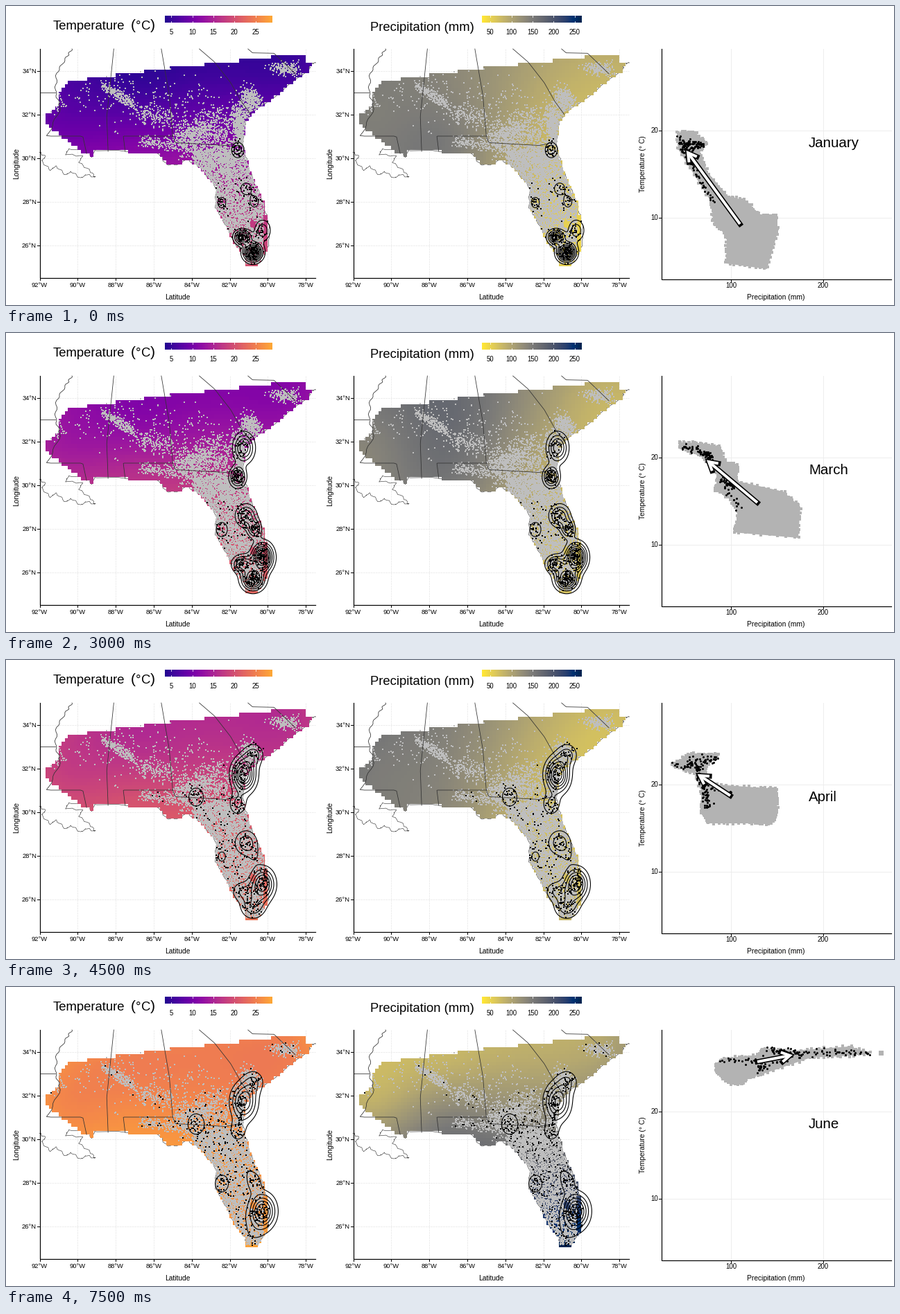
Recreate the animation shown at these times as a matplotlib script. Size 1280 px wide and 432 px high, loop 8 s.

```python
import numpy as np
import matplotlib.pyplot as plt
from matplotlib.animation import FuncAnimation
from matplotlib.colors import LinearSegmentedColormap, Normalize
from matplotlib.path import Path

W, H, DPI = 1280, 432, 100
PX = 72 / DPI                      # points per pixel
MAP_SHIFT = 452                    # distance between the two maps
plt.rcParams["font.family"] = "Liberation Sans"

fig = plt.figure(figsize=(W / DPI, H / DPI), dpi=DPI, facecolor="white")
ax = fig.add_axes([0, 0, 1, 1])
ax.set_axis_off()

GREY, BLOB, GRID, INK = "#bebebe", "#b3b3b3", "#ebebeb", "#333333"
TEMP_MAP = LinearSegmentedColormap.from_list("temp", plt.cm.plasma(np.linspace(0.03, 0.8, 256)))
RAIN_MAP = plt.cm.cividis_r
TEMP_NORM, RAIN_NORM = Normalize(3.4, 28.9), Normalize(30, 267)


def lon_x(lon):
    return 48.5 + (lon + 92) * 27.4


def lat_y(lat):
    return 93.5 + (34 - lat) * 31.5


def text(x, y, s, size, ha="center", va="baseline", **kw):
    return ax.text(x, y, s, fontsize=size * PX, ha=ha, va=va, **kw)


def line(xs, ys, color="black", width=1.0, **kw):
    return ax.plot(xs, ys, color=color, lw=width * PX, **kw)[0]


def dots(points, color, size, marker="s", z=4):
    return ax.plot(*points.T, marker, color=color, ms=size * PX, mew=0, zorder=z)[0]


def along(points, n):
    """n places along a path, the same number on every leg."""
    points = np.array(points, float)
    t = np.linspace(0, len(points) - 1, n)
    return np.c_[[np.interp(t, np.arange(len(points)), axis) for axis in points.T]].T


# --- land -----------------------------------------------------------------
NORTH = [(90, 108), (118, 105), (237, 89.4), (384, 73.6), (384, 70), (433, 70), (433, 83)]
ATLANTIC = [(439, 84), (437, 93), (412, 110), (388, 131), (357, 152), (345, 168), (341, 200),
            (351, 238), (371, 285), (379, 316), (379, 345), (362, 375)]
GULF = [(347, 374), (345, 362), (330, 343), (312, 307), (302, 290), (303, 262), (280, 233),
        (260, 221), (249, 229), (231, 229), (220, 212), (128, 208), (124, 218), (120, 212)]
WEST = [(112, 212), (83, 191), (57, 169), (57, 160), (74, 142), (74, 130)]
LAND = Path(NORTH + ATLANTIC + GULF + WEST)

x_edges = 57.3 + 4.57 * np.arange(85)
y_edges = 71 + 5.25 * np.arange(59)
cell_x, cell_y = np.meshgrid((x_edges[:-1] + x_edges[1:]) / 2, (y_edges[:-1] + y_edges[1:]) / 2)
sea = ~LAND.contains_points(np.c_[cell_x.ravel(), cell_y.ravel()]).reshape(cell_x.shape)

# west, north centre, north east, gulf, north and south Florida
ANCHORS = np.array([(70, 165), (190, 115), (410, 85), (180, 200), (310, 225), (360, 360)])


def kernel(x, y):
    return np.sqrt((x[..., None] - ANCHORS[:, 0]) ** 2 + (y[..., None] - ANCHORS[:, 1]) ** 2 + 1600)


def field(values):
    weights = np.linalg.solve(kernel(*ANCHORS.T), values)
    return np.ma.array(kernel(cell_x, cell_y) @ weights, mask=sea)


def on_land(points):
    lake = np.hypot(points[:, 0] - 356, points[:, 1] - 316) < 5
    return points[LAND.contains_points(points) & ~lake]


# --- survey points: segments (x0, y0, x1, y1, spread, count) ------------------
SURVEY = [
    (385, 90, 418, 92, 5, 190), (345, 125, 362, 140, 6, 220), (330, 165, 355, 138, 8, 400),
    (338, 165, 338, 200, 5, 430), (255, 185, 285, 180, 9, 350), (290, 165, 320, 190, 13, 330),
    (250, 200, 330, 215, 10, 520), (195, 195, 255, 200, 5, 180), (140, 115, 184, 142, 3.5, 230),
    (190, 155, 245, 165, 7, 180), (70, 145, 82, 138, 5, 35), (110, 120, 320, 150, 24, 260)]


def scatter_survey():
    rng = np.random.default_rng(4)
    groups = []
    for x0, y0, x1, y1, spread, n in SURVEY:
        t = rng.random(n)
        mid = np.c_[x0 + (x1 - x0) * t, y0 + (y1 - y0) * t]
        groups.append(mid + rng.normal(0, spread, (n, 2)))
    groups.append(rng.uniform((270, 208), (371, 372), (7000, 2)))
    return on_land(np.concatenate(groups))


survey = scatter_survey()

# --- fixed parts ------------------------------------------------------------
RIVER = [(-90.3, 35), (-90.6, 34.6), (-91.1, 33.9), (-91.17, 33), (-90.9, 32.3), (-91.6, 31),
         (-89.73, 31), (-89.53, 30.2)]
BORDERS = [
    RIVER,
    [(-92, 33), (-91.17, 33)],
    [(-88.1, 35), (-88.47, 31.9), (-88.4, 30.3)],
    [(-85.6, 35), (-85.18, 32.87), (-85, 31), (-84.86, 30.7), (-82.2, 30.57), (-81.5, 30.7)],
    [(-85, 31), (-87.6, 31), (-87.5, 30.3)],
    [(-83.6, 35), (-82.8, 34.4), (-81.95, 33.45), (-81.4, 32.6), (-80.9, 32)],
    [(-81.04, 35), (-80.8, 34.82), (-79.67, 34.8), (-78.55, 33.86)],
]
DELTA = [(48, 211), (57, 218), (51, 224), (64, 237), (72, 231), (86, 244), (94, 239), (108, 249),
         (116, 243), (129, 248), (121, 238), (105, 226), (110, 217), (86, 214), (90, 207),
         (130, 206)]


def draw_map(dx):
    for lon in range(-92, -77, 2):
        x = lon_x(lon) + dx
        line([x, x], [62, 393], GRID, 0.9, ls=(0, (3, 1)), zorder=0)
        line([x, x], [393, 396], zorder=9)
        text(x, 406, f"{-lon}°W", 9.4)
    for lat in range(26, 35, 2):
        y = lat_y(lat)
        line([48 + dx, 446 + dx], [y, y], GRID, 0.9, ls=(0, (3, 1)), zorder=0)
        line([45 + dx, 48 + dx], [y, y], zorder=9)
        text(44 + dx, y + 3.4, f"{lat}°N", 9.4, "right")
    line([48.5 + dx, 48.5 + dx, 446 + dx], [62, 393, 393], width=1.2, zorder=9)
    text(247 + dx, 423.5, "Latitude", 10.3)
    text(15.5 + dx, 227, "Longitude", 10.3, va="center", rotation=90)
    dots(survey + [dx, 0], GREY, 2.1, z=3)
    for border in BORDERS:
        lon, lat = along(border, 60).T
        bend = 1.5 * np.sin(np.arange(60) * 1.3) * (border is RIVER) * (lat > 31)
        line(lon_x(lon) + dx + bend, lat_y(lat), INK, 0.8, zorder=4)
    for shore in (DELTA, GULF[::-1], [(446, 82)] + ATLANTIC):
        x, y = along(shore, 90).T
        wobble = np.sin(np.arange(90) * 1.7)
        line(x + dx + wobble, y + wobble[::-1], INK, 0.6, zorder=1.5)


def draw_legend(x0, x1, cmap, norm, ticks):
    ramp = np.linspace(norm.vmin, norm.vmax, 200)[None]
    ax.pcolormesh(np.linspace(x0, x1, 201), [14, 24], ramp, cmap=cmap, norm=norm, antialiased=False)
    for tick in ticks:
        x = x0 + (x1 - x0) * norm(tick)
        line([x, x], [14, 16], "white", 0.8)
        line([x, x], [22, 24], "white", 0.8)
        text(x, 41, str(tick), 9.6)


draw_map(0)
draw_map(MAP_SHIFT)
draw_legend(228.5, 383.5, TEMP_MAP, TEMP_NORM, range(5, 30, 5))
draw_legend(686, 830, RAIN_MAP, RAIN_NORM, range(50, 300, 50))
for x, size, part in ((68, 18.5, "Temperature"), (180, 21, "("), (187, 18.5, "°"),
                      (195, 18.5, "C"), (208, 21, ")")):
    text(x, 33.5, part, size, "left")
text(525, 36.5, "Precipitation (mm)", 18.5, "left")

for value, x in ((100, 1045), (200, 1177.5)):
    line([x, x], [62, 395], GRID, 0.9, zorder=0)
    line([x, x], [395, 398], zorder=9)
    text(x, 407, str(value), 9.6)
for value, y in ((20, 180), (10, 305.5)):
    line([944, 1276], [y, y], GRID, 0.9, zorder=0)
    line([941, 944], [y, y], zorder=9)
    text(940.5, y + 3.4, str(value), 9.6, "right")
line([944.5, 944.5, 1276], [62, 395, 395], width=1.2, zorder=9)
text(1109.5, 423.5, "Precipitation (mm)", 10.3)
text(918, 228, "Temperature (° C)", 10.3, va="center", rotation=90)

# --- months -----------------------------------------------------------------
# gathering sites from north to south: x, y and spread on both axes
SITES = [(357, 137, 8, 9), (343, 166, 9, 13), (274, 198, 8, 10), (334, 208, 7, 9),
         (346, 264, 9, 10), (358, 283, 6, 8), (311, 284, 7, 9), (370, 324, 9, 12),
         (341, 334, 9, 8), (356, 356, 10, 10)]
months = []
grid_x, grid_y = np.meshgrid(np.arange(240, 447), np.arange(95, 381))


def draw_arrow(tail, tip):
    tail, tip = np.array(tail), np.array(tip)
    angle = np.arctan2(*(tail - tip)[::-1])
    barbs = [tip + 14 * np.array([np.cos(a), np.sin(a)])
             for a in (angle - np.pi / 6, angle + np.pi / 6)]
    parts = []
    for color, width, cap, z in (("black", 7.2, "projecting", 7), ("white", 4, "butt", 8)):
        for path in ([tail, tip], [barbs[0], tip, barbs[1]]):
            parts.append(line(*np.array(path).T, color, width, zorder=z,
                              solid_capstyle=cap, solid_joinstyle="miter"))
    return parts


def add_month(name, temps, rain, strengths, scale, extra, reach, blob, niche, arrow):
    rng = np.random.default_rng(len(months) + 20)
    parts = [text(1157, 204.5, name, 20.5, "left")]

    north, gulf, south = temps
    temp = [north + 0.6 * (gulf - north), north, north + 0.3, gulf,
            gulf + 0.3 * (south - gulf), south]
    density = 0
    near = []
    for (x, y, sx, sy), amp in zip(SITES, strengths):
        sx, sy = sx * scale, sy * scale
        density = density + amp * np.exp(-((grid_x - x) / sx) ** 2 / 2 - ((grid_y - y) / sy) ** 2 / 2)
        near.append(rng.normal((x, y), (0.7 * sx, 0.7 * sy), (int(11 * amp), 2)))
    pool = survey[survey[:, 1] > reach]
    seen = on_land(np.concatenate(near + [rng.choice(pool, extra)]))

    layers = ((0, temp, TEMP_MAP, TEMP_NORM), (MAP_SHIFT, rain, RAIN_MAP, RAIN_NORM))
    for dx, values, cmap, norm in layers:
        parts.append(ax.pcolormesh(x_edges + dx, y_edges, field(values), cmap=cmap, norm=norm,
                                   antialiased=False, zorder=2))
        parts.append(dots(seen + [dx, 0], "black", 2.4, z=5))
        parts.append(ax.contour(grid_x + dx, grid_y, density, levels=np.arange(1, 12),
                                colors="black", linewidths=1.1 * PX, zorder=6))

    # ragged outline made from small squares along the edge
    rim = along(blob + blob[:1], 130)
    parts += ax.fill(*np.array(blob).T, color=BLOB, lw=0, zorder=2)
    parts.append(dots(rim + rng.uniform(-1.5, 1.5, rim.shape), BLOB, 5, z=2))
    trail = along(niche, 150)
    parts.append(dots(trail + rng.normal(0, 2.6, trail.shape), "black", 3, "o", z=5))
    parts += draw_arrow(*arrow)
    months.append(parts)


add_month(
    "January", (5, 11, 19.5), (145, 135, 85, 152, 78, 50),
    (0, 0, 0, 2.9, 1.6, 1.8, 1.6, 2.8, 6, 8.5), 0.85, 30, 255,
    [(968, 183), (991, 181), (1010, 197), (1000, 210), (1011, 240), (1040, 274), (1068, 282),
     (1086, 301), (1111, 302), (1112, 328), (1097, 380), (1038, 372), (1039, 333), (1019, 311),
     (1017, 284), (969, 207)],
    [(972, 193), (976, 208), (984, 198), (1006, 201), (982, 208), (988, 230), (1020, 284)],
    ((1058, 315), (983, 212)))

add_month(
    "February", (7, 12.5, 20), (122, 145, 80, 148, 84, 48),
    (0, 0, 0, 2.8, 2.3, 2, 1, 6, 4.5, 7.5), 0.9, 25, 255,
    [(972, 182), (998, 182), (1013, 213), (1042, 263), (1104, 272), (1118, 291), (1098, 320),
     (1088, 353), (1031, 344), (1031, 318), (1021, 303), (1025, 268), (1015, 262), (1024, 252),
     (1000, 216), (974, 200)],
    [(974, 187), (1002, 189), (975, 193), (1002, 201), (985, 203), (1010, 220), (1038, 268)],
    ((1060, 293), (993, 206)))

add_month(
    "March", (11.2, 16, 22), (138, 172, 83, 160, 92, 65),
    (0, 4.8, 0, 5, 4, 3.8, 1.8, 8.5, 4.5, 7), 1.05, 40, 240,
    [(972, 158), (1000, 159), (1029, 164), (1037, 187), (1054, 191), (1054, 214), (1120, 229),
     (1145, 251), (1142, 296), (1048, 288), (1056, 262), (1044, 240), (1023, 227), (1026, 207),
     (1005, 180), (972, 166)],
    [(975, 164), (998, 170), (1018, 178), (1005, 175), (1030, 200), (1050, 222), (1030, 212),
     (1057, 252)],
    ((1083, 245), (1013, 186)))

add_month(
    "April", (15.8, 20, 23.5), (150, 138, 72, 135, 76, 76),
    (2.4, 7, 1.8, 2.2, 2.8, 0.8, 1.2, 6, 2, 2.8), 1.2, 110, 170,
    [(961, 151), (985, 135), (1028, 135), (1008, 157), (1011, 179), (1080, 184), (1112, 186),
     (1111, 222), (1104, 237), (1075, 236), (1013, 236), (1003, 222), (1004, 195), (994, 164),
     (976, 158)],
    [(964, 153), (1000, 155), (984, 146), (1024, 142), (993, 157), (1006, 186), (1011, 215),
     (1008, 182), (1045, 193)],
    ((1044, 196), (1000, 167)))

add_month(
    "May", (20.2, 23.8, 25.6), (148, 106, 82, 125, 80, 148),
    (2.4, 7.3, 1.9, 1.4, 1.8, 0.5, 1.3, 6.5, 0.9, 3.2), 1.25, 170, 130,
    [(1009, 114), (1032, 109), (1100, 114), (1118, 109), (1144, 115), (1084, 127), (1102, 145),
     (1102, 157), (1074, 177), (1068, 188), (1034, 179), (1024, 160), (1024, 146), (1002, 135)],
    [(1012, 117), (1050, 120), (1085, 121), (1130, 115), (1080, 120), (1025, 122), (1050, 132),
     (1024, 133), (1052, 145), (1047, 168)],
    ((1053, 152), (1068, 126)))

add_month(
    "June", (24.8, 27, 27.8), (85, 86, 98, 150, 155, 258),
    (2, 5.2, 1.9, 1.6, 0.8, 1.5, 1.7, 6.2, 0.3, 0.9), 1.3, 260, 80,
    [(1024, 111), (1036, 103), (1085, 98), (1092, 89), (1135, 92), (1215, 86), (1246, 95),
     (1220, 99), (1160, 102), (1090, 126), (1070, 130), (1061, 140), (1043, 140), (1024, 123)],
    [(1030, 107), (1090, 105), (1085, 119), (1145, 96), (1097, 90), (1145, 95), (1195, 95),
     (1243, 95)],
    ((1083, 108), (1130, 99)))
months[-1].append(dots(np.array([[1260.5, 95]]), BLOB, 7, z=2))

ax.set_xlim(0, W)
ax.set_ylim(H, 0)


def update(step):
    current = step // 3
    for i, parts in enumerate(months):
        for part in parts:
            part.set_visible(i == current)
    return []


update(0)
anim = FuncAnimation(fig, update, frames=16, interval=500, repeat=True, repeat_delay=0, blit=False)
plt.show()
```
